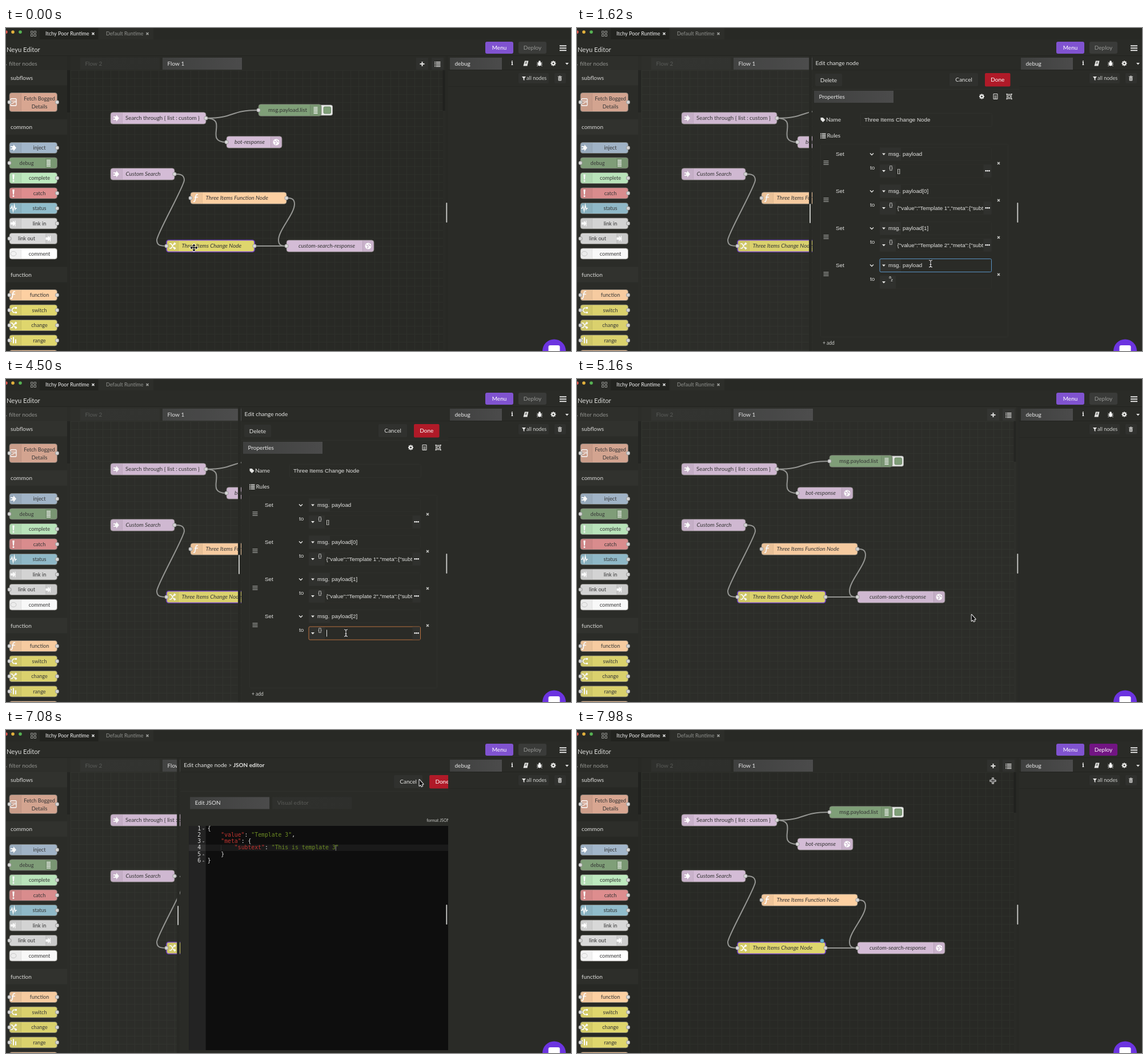
Recreate the animation shown at these times as an HTML page with a canvas. Size 989 by 566 pixels, loop 8 s.

```html
<!DOCTYPE html>
<html lang="en">
<head>
<meta charset="utf-8">
<title>Flow editor</title>
<style>
html, body { margin: 0; width: 100%; height: 100%; overflow: hidden; background: #2a2b27; }
canvas { display: block; }
</style>
</head>
<body>
<canvas id="stage" width="989" height="566"></canvas>
<script>
const W = 989, H = 566, LOOP = 8000;
const g = document.getElementById('stage').getContext('2d');
const UI = '10px Lato, sans-serif';
const SMALL = '9.1px Lato, sans-serif';
const LABEL = '9.8px Lato, sans-serif';
const FIELD = '9.8px "Liberation Sans", Arial, sans-serif';
const CODE = '9.8px "DejaVu Sans Mono", monospace';
const BG = '#2a2b27', LIGHT = '#e4e4e2', DIM = '#8a8b88';

// ---------- drawing helpers ----------
function box(x, y, w, h, fill, r = 0, stroke, lw = 1) {
  g.beginPath();
  g.roundRect(x, y, w, h, r);
  if (fill) { g.fillStyle = fill; g.fill(); }
  if (stroke) { g.strokeStyle = stroke; g.lineWidth = lw; g.stroke(); }
}
function dot(x, y, r, fill) {
  g.beginPath(); g.arc(x, y, r, 0, 7); g.fillStyle = fill; g.fill();
}
function text(s, x, y, fill = LIGHT, font = UI, align = 'left') {
  g.font = font; g.fillStyle = fill; g.textAlign = align; g.textBaseline = 'middle';
  g.fillText(s, x, y);
}
function shape(pts, fill, stroke, lw = 1) {
  g.beginPath();
  pts.forEach(([x, y]) => g.lineTo(x, y));
  g.closePath();
  if (stroke) { g.strokeStyle = stroke; g.lineWidth = lw; g.lineJoin = 'round'; g.stroke(); }
  if (fill) { g.fillStyle = fill; g.fill(); }
}
function path(d, color, lw = 1) {
  g.strokeStyle = color; g.lineWidth = lw; g.stroke(new Path2D(d));
}
function at(x, y, draw) {
  g.save(); g.translate(x, y); draw(); g.restore();
}
function clip(x, y, w, h, draw) {
  g.save(); g.beginPath(); g.rect(x, y, w, h); g.clip(); draw(); g.restore();
}
const bars = (x, y, w, n, gap, color, lw) => {
  for (let i = 0; i < n; i++) box(x, y + i * gap, w, lw, color);
};
const caret = (x, y, c = LIGHT, s = 3) => shape([[x - s, y - s / 2], [x + s, y - s / 2], [x, y + s / 2 + .5]], c);
const chevron = (x, y) => path(`M${x - 3} ${y - 1.5}l3 3l3-3`, LIGHT, 1.4);
const cross = (x, y, c) => path(`M${x - 2} ${y - 2}l4 4m0-4l-4 4`, c, 1.5);
function tab(x, y, w, label, on) {
  const fill = g.createLinearGradient(x, 0, x + w, 0);
  fill.addColorStop(0, on ? '#3f403f' : '#2f302d');
  fill.addColorStop(1, on ? '#4b4b4b' : '#2e2f2c');
  box(x, y, w, 21, fill);
  text(label, x + 8.5, y + 10.5, on ? '#e8e8e8' : '#595a57');
}
function gear(x, y) {
  at(x, y, () => {
    for (let i = 0; i < 8; i++) { g.rotate(Math.PI / 4); box(-1, -4.5, 2, 3, LIGHT); }
    g.beginPath(); g.arc(0, 0, 2.5, 0, 7); g.strokeStyle = LIGHT; g.lineWidth = 2; g.stroke();
  });
}

// ---------- flow nodes ----------
const icons = {
  arrow() { shape([[-5, -3], [0, -3], [0, -6], [5, 0], [0, 6], [0, 3], [-5, 3], [-5, 1.3], [-2, 1.3], [-2, -1.3], [-5, -1.3]], '#fff'); },
  list() { bars(-3.5, -5.5, 7, 5, 2.6, '#fff', 1.2); },
  bang() { shape([[-1.7, -6.5], [1.7, -6.5], [.9, 2.5], [-.9, 2.5]], '#fff'); dot(0, 5, 1.5, '#fff'); },
  pulse() { path('M-6 0h2l1.5-4l2 9l2-11l1.5 8l1-2h2', '#fff', 1.4); },
  link() { shape([[-5, -2], [-1, -2], [-1, -5], [4, 0], [-1, 5], [-1, 2], [-5, 2]], '#fff'); path('M3-5v10', '#fff', 1.2); },
  bubble() { g.beginPath(); g.ellipse(0, 0, 5, 4, 0, 0, 7); g.strokeStyle = '#ccc'; g.lineWidth = 1; g.stroke(); },
  fn() { path('M3-6q-3-1.5-3.7 2.5l-1.3 7q-.7 3.5-3 2.5M-3-1.5h6', '#fff', 1.7); },
  fork() { path('M-6 0h3l3-4h5M-3 0l3 4h5', '#fff', 1.6); box(3, -5.5, 3, 3, '#fff'); box(3, 2.5, 3, 3, '#fff'); },
  swap() { path('M-5-4h3l5 8h3M-5 4h3l5-8h3M3.5-6l2 2l-2 2M3.5 2l2 2l-2 2', '#fff', 1.5); },
  range() { bars(-5, -4, 2, 2, 4, '#fff', 2.5); box(-1, -6, 2, 11, '#fff'); box(3, -2, 2, 7, '#fff'); },
  globe() { dot(0, 0, 5.5, '#fff'); path('M-4-2l3 1l1 3l-2 2M1-4l1 3l3 1', '#c7aeca', 1.3); },
  flow() { box(-5, -6, 10, 12, null, 1, '#fff', 1.3); path('M-5-2h10M-5 2h4l2-2h4', '#fff', 1.2); }
};
function port(x, y) { box(x - 3, y - 3, 6, 6, '#d9d9d9', 2, '#8c8c8c', .8); }

// side: icon on the 'l' or 'r'; ports: any of 'i', 'o'
function node(o) {
  const { x, y, w, h = 20.5, color, icon, side = 'l', ports = '', edge = '#77756f' } = o;
  const ix = side === 'l' ? x : x + w - 20;
  box(x, y - h / 2, w, h, color, 4);
  clip(x, y - h / 2, w, h, () => box(ix, y - h / 2, 20, h, 'rgba(0,0,0,.05)', 4));
  box(side === 'l' ? x + 20 : ix, y - h / 2, .8, h, 'rgba(0,0,0,.12)');
  box(x, y - h / 2, w, h, null, 4, edge, o.lw || .8);
  at(ix + (o.tuck || 10), y, icons[icon]);
  if (ports.includes('i')) port(x, y);
  if (ports.includes('o')) port(x + w, y);
  if (o.label) text(o.label, o.tx, y, '#333', o.font || LABEL);
}

const PINK = '#d4bcd6', PEACH = '#fdd0a2', YELLOW = '#dfd66d', GREEN = '#7f9f78';
const ITALIC = 'italic ' + LABEL;
const wires = [
  'M350 158C402.5 158 389.5 144 442 144',
  'M350 158C391 158 345 200 386 200',
  'M295 256C303.5 256 312 256 312 266.5C312 277 264 361 264 371.5C264 382 272 382 281 382',
  'M491 298C498 298 505 298 505 308.5C505 326 477 354 477 371.5C477 382 484 382 491 382',
  'M435 382H491'
];
const flowNodes = [
  { x: 183, y: 158, w: 167, color: PINK, icon: 'arrow', ports: 'o', label: 'Search through { list : custom }', tx: 209 },
  { x: 442, y: 144, w: 110, color: GREEN, icon: 'list', side: 'r', ports: 'i', label: 'msg.payload.list', tx: 459 },
  { x: 386, y: 200, w: 97, color: PINK, icon: 'globe', side: 'r', ports: 'i', label: 'bot-response', tx: 400, font: ITALIC },
  { x: 183, y: 256, w: 112, color: PINK, icon: 'arrow', ports: 'o', label: 'Custom Search', tx: 209.5, font: ITALIC },
  { x: 323, y: 298, w: 168, color: PEACH, icon: 'fn', ports: 'io', label: 'Three Items Function Node', tx: 349.5, font: ITALIC },
  { x: 281, y: 382, w: 154, color: YELLOW, icon: 'swap', ports: 'io', label: 'Three Items Change Node', tx: 307.5, font: ITALIC, edge: '#7546c8', lw: 1.7 },
  { x: 491, y: 382, w: 153, color: PINK, icon: 'globe', side: 'r', ports: 'i', label: 'custom-search-response', tx: 512, font: ITALIC }
];
const palette = [
  ['inject', 210, '#a2b6ca', 'arrow', 'l', 'o'], ['debug', 236.5, GREEN, 'list', 'r', 'i'],
  ['complete', 263, '#bde9be', 'bang', 'l', 'o'], ['catch', 289.5, '#de8d8e', 'bang', 'l', 'o'],
  ['status', 316, '#90bccb', 'pulse', 'l', 'o'], ['link in', 342.5, '#d8d8d8', 'link', 'l', 'o'],
  ['link out', 369, '#d8d8d8', 'link', 'r', 'i'], ['comment', 395.5, '#ffffff', 'bubble', 'l', ''],
  ['function', 468, PEACH, 'fn', 'l', 'io'], ['switch', 494.5, YELLOW, 'fork', 'l', 'io'],
  ['change', 521, YELLOW, 'swap', 'l', 'io'], ['range', 547.5, YELLOW, 'range', 'l', 'io'],
  ['', 574, '#e6b58a', 'fn', 'l', 'io']
];

function drawHeader(deployOn) {
  box(0, 0, W, 20, '#282925');
  box(59, 0, 102, 20, '#22231f');
  box(163, 0, 95, 20, '#2d2e2a');
  dot(0, 7, 2.8, '#e0564c'); dot(12, 7, 2.8, '#e3b23d'); dot(25, 7, 2.8, '#57b454');
  for (const [x, y] of [[43.5, 5.5], [49, 5.5], [43.5, 11], [49, 11]]) box(x, y, 3.5, 3.5, null, 0, '#a0a19e', .9);
  text('Itchy Poor Runtime', 69, 10, '#f0f0f0', SMALL);
  cross(152.5, 10, '#e8e8e8');
  text('Default Runtime', 175, 10, '#8f908d', SMALL);
  cross(247.5, 10, '#a5a6a3');
  text('Neyu Editor', 1, 38.5, '#dededc', '11.2px Lato, sans-serif');
  box(839, 24, 49, 21, '#8053d0', 3);
  text('Menu', 863.5, 35, '#fff', UI, 'center');
  box(897, 24, 49, 21, deployOn ? '#721583' : '#3a3b39', 3);
  text('Deploy', 921.5, 35, deployOn ? '#fff' : '#969794', UI, 'center');
  bars(969, 30.3, 12, 3, 4, '#e8e8e8', 1.9);
  box(0, 48, W, 1, '#22231f');
}

function drawPalette() {
  text('filter nodes', 5, 62.5, '#92938f', UI);
  path('M-2 62l3 3', '#888', 1.2);
  box(0, 74, 107, 492, '#272824');
  [['subflows', 87], ['common', 173.5], ['function', 432]].forEach(([s, y]) => {
    box(0, y - 13.5, 107, 27, '#2d2e2a');
    text(s, 8, y + .5, '#dededc');
  });
  node({ x: 6, y: 130, w: 83.5, h: 33, color: '#d8a691', icon: 'flow', ports: 'io', tuck: 7 });
  text('Fetch Bogged', 58.5, 124, '#333', SMALL, 'center');
  text('Details', 58.5, 138, '#333', SMALL, 'center');
  for (const [name, y, color, icon, side, ports] of palette) {
    node({ x: 6, y, w: 83.5, h: 19, color, icon, side, ports, tuck: side === 'l' ? 7 : 5 });
    text(name, side === 'l' ? 58.5 : 36, y + .5, '#333', SMALL, 'center');
  }
  box(107, 49, 6, 517, '#282925');
  box(107, 74, 5, 74, '#20211e');
}

function drawWorkspace(changed) {
  tab(130, 52, 139, 'Flow 2', false);
  tab(274, 52, 139, 'Flow 1', true);
  box(718, 52, 21, 21, '#30312e');
  path('M724.5 63h8M728.5 59v8', LIGHT, 2);
  box(745, 52, 21, 21, '#30312e');
  bars(750, 59, 1.5, 4, 2.6, LIGHT, 1.3); bars(752.5, 59, 8, 4, 2.6, LIGHT, 1.3);
  box(113, 74, 652, 492, '#282925');
  for (let x = 113; x < 765; x += 14) box(x, 74, 1, 492, '#2e302b');
  for (let y = 74; y < H; y += 14) box(113, y, 652, 1, '#2e302b');
  box(764.5, 74, 4, 71, '#20211e');
  wires.forEach(d => path(d, '#969794', 2));
  box(548, 135, 23.5, 18, '#e9ebe8', 3, '#aaa', .8);
  box(556, 138, 12.5, 12, GREEN, 2, '#657f60', .8);
  flowNodes.forEach(node);
  if (changed) { dot(429, 369.5, 3.7, '#3f6f85'); dot(429, 369.5, 3, '#6aaed0'); }
}

function drawSidebar() {
  box(774, 49, 215, 517, BG);
  tab(777, 52, 91, 'debug', true);
  text('i', 886, 62, '#fff', 'bold 10px "Noto Serif", serif', 'center');
  at(910, 62, () => { shape([[-2, -4.5], [4.5, -4.5], [2.5, 4.5], [-4.5, 4.5]], LIGHT); path('M-1-2h3M-1.5 0h3', BG, .9); });
  at(934, 62, () => {
    g.beginPath(); g.ellipse(0, .8, 2.6, 3.7, 0, 0, 7); g.fillStyle = '#fff'; g.fill();
    dot(0, -3, 1.8, '#fff');
    path('M-4.5-2l2 1.5h5l2-1.5M-5 1.2h10M-4.5 5l2-2h5l2 2', '#fff', 1);
  });
  gear(958, 62);
  caret(982, 62.5);
  box(774, 73, 215, 1, '#22231f');
  box(897, 79, 53, 18, '#30312e', 2);
  shape([[903, 85], [910, 85], [907.4, 88.3], [907.4, 92], [905.6, 91], [905.6, 88.3]], LIGHT);
  text('all nodes', 911, 88.5, '#cfd0cd', SMALL);
  box(960, 79, 20, 18, '#30312e', 2);
  at(969.5, 88.5, () => { box(-2.8, -2.2, 5.6, 6.2, '#d5d5d3', 1); box(-3.6, -3.8, 7.2, 1.1, '#d5d5d3'); box(-1.2, -4.8, 2.4, 1.2, '#d5d5d3'); path('M-1-1v4M1-1v4', BG, .7); });
  box(774, 102, 215, 1, '#252622');
}

// ---------- trays ----------
function drawTray(left, shift, body) {
  clip(113, 49, 661, H - 49, () => at(shift, 0, () => {
    box(left - 6, 49, 5, H, '#282925');
    box(left, 49, 780 - left + 10, H, BG);
    box(left - 5, 308, 2, 34, '#c2c3c0', 1);
    box(left, 73, 380 + 412 - left, 1, '#252622');
    box(left, 107, 380 + 412 - left, 1, '#30312d');
    box(652, 79, 50, 23, '#30312e', 2);
    text('Cancel', 677, 91, LIGHT, UI, 'center');
    box(714, 79, 44.5, 23.5, '#b01a28', 2);
    text('Done', 736.3, 91, '#fff', UI, 'center');
    body();
  }));
}

function drawRule(k, r, t) {
  const y = 221 + 65 * k, v = y + 29.5;
  bars(431.5, y + 11.5, 9, 3, 3, '#b5b6b3', 1.1);
  text('Set', 453, y, LIGHT, FIELD);
  chevron(516, y);
  box(530, y - 12, 37, 24, '#30312e');
  box(530, y - 11.5, 195.5, 23, null, 2, r.focus === 'name' ? '#5a93c4' : '#2e2f2b');
  caret(537, y);
  text('msg.', 545, y, LIGHT, FIELD);
  text(r.name, 570, y, LIGHT, FIELD);
  if (r.focus === 'name' && t > 1740 && t % 1000 > 400) box(570 + g.measureText(r.name).width, y - 6, 1, 12, LIGHT);
  cross(738, y + 16, '#c5c6c3');
  text('to', 513, y + 24.5, LIGHT, FIELD);
  box(530, v - 11.5, 28, 23, '#30312e');
  box(530, v - 11.5, 195.5, 23, null, 2, { type: '#5a93c4', json: '#b9703f' }[r.focus] || '#2e2f2b');
  if (r.focus === 'type') box(530, v - 11.5, 28, 23, null, 2, '#5a93c4');
  caret(537, v);
  if (r.json) {
    text('{}', 549.5, y + 24, LIGHT, FIELD, 'center');
    box(711.5, v - 11, 13.5, 22, '#30312e');
    for (const x of [715.7, 718.7, 721.7]) dot(x, v - .3, 1.2, '#fff');
    clip(560, v - 11, 151, 22, () => text(r.value, 560.5, v + .5, LIGHT, FIELD));
    if (r.focus === 'json' && !r.value) box(561, v - 6, 1, 12, LIGHT);
  } else {
    text('a', 548, v - 9, LIGHT, '7.5px "Liberation Sans", sans-serif', 'center');
    text('z', 551, v - 3.5, LIGHT, '7.5px "Liberation Sans", sans-serif', 'center');
  }
}

const template = n => `{"value":"Template ${n}","meta":{"subtext":"This is template ${n}"}}`;
const types = ['msg.', 'flow.', 'global.', 'string', 'number', 'boolean', 'JSON', 'buffer', 'timestamp'];

function drawChangeTray(t) {
  text('Edit change node', 417.5, 62);
  box(417, 80, 47, 22, '#30312e', 2);
  text('Delete', 440.5, 91.5, LIGHT, UI, 'center');
  tab(415, 110, 139, 'Properties', true);
  gear(708.5, 120);
  at(732.5, 120, () => { box(-3.5, -4.5, 7, 9, null, 0, LIGHT, 1); bars(-2, -1.5, 4, 3, 2, LIGHT, .9); });
  at(756.5, 120, () => {
    box(-3.8, -3.8, 7.6, 7.6, null, 0, LIGHT, 1); box(-2, -2, 4, 4, null, 0, LIGHT, 1);
    for (const x of [-5, 3.4]) for (const y of [-5, 3.4]) box(x, y, 1.8, 1.8, LIGHT);
  });
  shape([[426.5, 157], [430.5, 157], [434.5, 161], [430.5, 165], [426.5, 161]], LIGHT);
  text('Name', 436, 161);
  box(496.5, 149.5, 230, 23, null, 2, '#2f302c');
  text('Three Items Change Node', 503, 161.5, LIGHT, FIELD);
  bars(426, 184.5, 1.6, 4, 2.5, LIGHT, 1.4); bars(428.5, 184.5, 7, 4, 2.5, LIGHT, 1.4);
  text('Rules', 437.5, 189);
  box(426.5, 203.5, 328, 338, null, 2, '#2f302c');
  const rules = [
    { name: 'payload', value: '[]', json: true },
    { name: 'payload[0]', value: template(1), json: true },
    { name: 'payload[1]', value: template(2), json: true }
  ];
  if (t > 1080) {
    const typed = [1900, 2040, 2200].filter(s => t >= s).length;
    rules.push({
      name: 'payload' + '[2]'.slice(0, typed),
      json: t > 3680,
      value: t < 4680 ? '' : template(t < 7000 ? 2 : 3),
      focus: t < 1560 ? '' : t < 3000 ? 'name' : t < 3680 ? 'type' : t < 4680 ? 'json' : ''
    });
  }
  rules.forEach((r, k) => drawRule(k, r, t));
  text('+ add', 430, 552, '#cfd0cd', '8.5px Lato, sans-serif');
  if (t > 3033 && t < 3680) drawMenu(t);
}

function drawMenu(t) {
  const p = Math.min(1, (t - 3033) / 100);
  const h = 264 * (.5 - Math.cos(p * Math.PI) / 2);
  clip(530, 356, 77.5, h, () => {
    box(530, 356, 77.5, 264, BG);
    if (t > 3480) box(530, 499, 77.5, 24, '#3a3b38');
    types.forEach((s, i) => text(s, 543.5, 367 + 24 * i, LIGHT, FIELD));
  });
}

const CH = 5.9;
function drawCode(t) {
  const a = t < 6060 ? 2 : 3, b = t < 6660 ? 2 : 3;
  const lines = [
    [[0, '{']],
    [[4, '"value"', 'k'], [11, ':'], [13, `"Template ${a}"`, 's'], [25, ',']],
    [[4, '"meta"', 'k'], [10, ':'], [12, '{']],
    [[8, '"subtext"', 'k'], [17, ':'], [19, `"This is template ${b}"`, 's']],
    [[4, '}']],
    [[0, '}']]
  ];
  const active = t < 5480 ? 0 : t < 6400 ? 1 : 3;
  const ink = { k: '#c23430', s: '#6c8c23' };
  box(293, 168, 461, 393, '#0e0e0e');
  box(293, 168, 29.5, 393, '#232323');
  box(293, 178.4 - 11.2 + 11.2 * active, 29.5, 11.2, '#313131');
  box(322.5, 178.4 - 11.2 + 11.2 * active, 431.5, 11.2, '#1a1a1a');
  if (t > 5500 && t < 6060) box(325.5 + 23 * CH, 178.4, CH, 11.2, '#55542f');
  if (t > 6440 && t < 6660) box(325.5 + 37 * CH, 200.8, CH, 11.2, '#55542f');
  lines.forEach((parts, i) => {
    const y = 173.2 + 11.2 * i;
    text(i + 1, 314, y, '#dcdcdc', CODE, 'right');
    if (i === 0 || i === 2) caret(318.5, y + .5, '#777', 2);
    if (i > 3) shape([[316.5, y + 1.5], [320.5, y + 1.5], [318.5, y - 1]], '#777');
    parts.forEach(([col, s, kind]) => text(s, 325.5 + col * CH, y, ink[kind] || '#e0e0e0', CODE));
  });
  for (let y = 202; y < 212; y += 2) box(349, y, .8, 1, '#444');
  if (active === 1 && t > 6060) box(325.5 + 24 * CH, 179, 1, 10, '#ccc');
  if (active === 3) box(325.5 + 38 * CH, 201.5, 1, 10, '#8a8a8a');
}
function drawJsonTray(t) {
  text('Edit change node > ', 284, 62);
  text('JSON editor', 284 + g.measureText('Edit change node > ').width, 62, LIGHT, 'bold ' + UI);
  tab(295, 117.5, 139, 'Edit JSON', true);
  tab(439, 117.5, 139, 'Visual editor', false);
  text('format JSON', 709, 158.5, '#c9cac7', '7.2px Lato, sans-serif');
  drawCode(t);
}

// ---------- pointer ----------
const pointers = {
  move() {
    const d = 'M0-5V5M-5 0H5M-2-3.5L0-5.5L2-3.5M-2 3.5L0 5.5L2 3.5M-3.5-2L-5.5 0L-3.5 2M3.5-2L5.5 0L3.5 2';
    path(d, '#fff', 3.2); path(d, '#111', 1.5);
  },
  ibeam() {
    const d = 'M-3-6Q0-6 0-4V4Q0 6-3 6M3-6Q0-6 0-4M0 4Q0 6 3 6M-1.5 1.5h3';
    path(d, '#111', 2.6); path(d, '#f2f2f2', 1.1);
  },
  hand() {
    shape([[-2, -6], [0, -6], [.4, -1.5], [4, -.5], [4.6, 1.5], [3.5, 6], [-1.5, 6], [-5, 1], [-4, 0], [-2, 1.5]], '#fff', '#111', 1.6);
  },
  arrow() {
    shape([[0, -5], [0, 6], [2.4, 3.8], [4, 7], [5.6, 6.2], [4.2, 3.2], [7, 3]].map(([x, y]) => [x - .5, y]), '#111', '#eee', 2);
  },
  plus() {
    path('M-5.5 0h11M0-5.5v11', '#eee', 3.6); path('M-4.5 0h9M0-4.5v9', '#222', 1.3);
  }
};
const route = [
  [0, 329, 385, 'move'], [320, 329, 385, 'arrow'], [580, 329, 385, 'arrow'], [1000, 440, 551, 'hand'],
  [1150, 440, 551, 'arrow'], [1500, 619, 413, 'ibeam'], [2400, 619, 413, 'ibeam'], [2900, 548, 447, 'hand'],
  [3180, 548, 447, 'hand'], [3540, 558, 511, 'hand'], [3720, 558, 511, 'arrow'], [4200, 595, 445, 'ibeam'],
  [4700, 595, 445, 'ibeam'], [4920, 718, 446, 'hand'], [5080, 718, 446, 'arrow'], [5480, 466, 183, 'ibeam'],
  [6080, 466, 183, 'ibeam'], [6380, 548, 206, 'ibeam'], [6680, 548, 206, 'arrow'], [7000, 724, 92, 'hand'],
  [7068, 724, 92, 'arrow'], [7480, 724, 92, 'hand'], [7680, 724, 92, 'plus'], [7960, 728, 89, 'plus'], [LOOP, 728, 89, 'plus']
];
function drawPointer(t) {
  const i = route.findIndex((p, k) => t >= p[0] && t < route[k + 1][0]);
  const [t0, x0, y0, kind] = route[i], [t1, x1, y1] = route[i + 1];
  const p = (t - t0) / (t1 - t0), e = p * p * (3 - 2 * p);
  at(x0 + (x1 - x0) * e, y0 + (y1 - y0) * e, pointers[kind]);
}

// ---------- timeline ----------
// cubic-bezier(.25, .1, .25, 1)
function ease(x) {
  let lo = 0, hi = 1;
  for (let i = 0; i < 20; i++) {
    const s = (lo + hi) / 2, q = 1 - s;
    if (.75 * s * q * q + .75 * s * s * q + s * s * s < x) lo = s; else hi = s;
  }
  const q = 1 - lo;
  return .3 * lo * q * q + 3 * lo * lo * q + lo ** 3;
}
const SLIDE = 200;
// fraction of a tray that is open, given [open, close] start times
function openness(t, spans) {
  for (const [a, b] of spans) {
    if (t >= a && t < b) return ease(Math.min(1, (t - a) / SLIDE));
    if (t >= b && t < b + SLIDE) return 1 - ease((t - b) / SLIDE);
  }
  return 0;
}
const changeSpans = [[300, 4970], [7320, 7640]], jsonSpans = [[5220, 7067]];

function draw(t) {
  const saved = t >= 7660;
  box(0, 0, W, H, BG);
  drawWorkspace(saved);
  drawPalette();
  if (t >= 300 && t < 7840) box(0, 49, 769, H - 49, 'rgba(120,120,115,.05)');
  const c = openness(t, changeSpans), j = openness(t, jsonSpans);
  if (c > 0) drawTray(412, (1 - c) * 368, () => drawChangeTray(t));
  if (j > 0) drawTray(278, (1 - j) * 502, () => drawJsonTray(t));
  drawSidebar();
  if (!c && !j) box(769, 49, 5, H, '#282925');
  box(770.3, 306, 2, 35, '#c2c3c0', 1);
  drawHeader(saved);
  dot(959.5, 566, 20.5, '#6c34e0');
  box(949.5, 556, 20, 14, '#fff', 3);
  drawPointer(t);
}

function tick() {
  draw(performance.now() % LOOP);
  requestAnimationFrame(tick);
}
tick();
</script>
</body>
</html>
```
